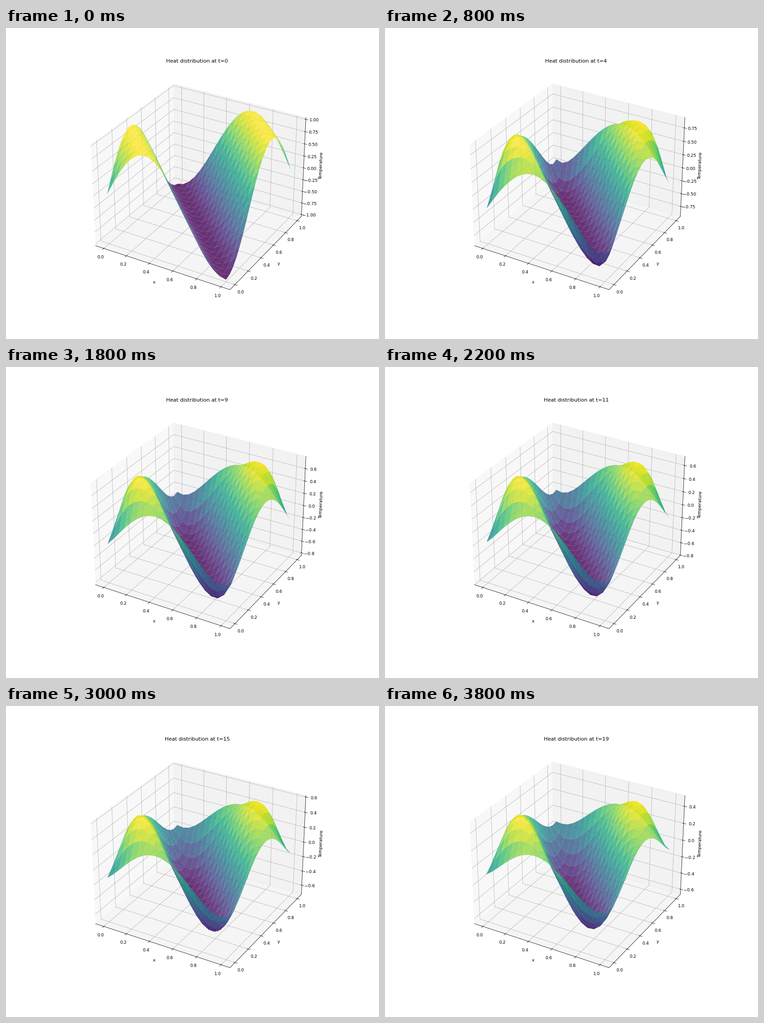
Write a matplotlib script that moves like this. It is 820 px wide and 683 px high and loops after 4 s.

```python
import numpy as np
import matplotlib.pyplot as plt
from matplotlib.animation import FuncAnimation

W, H = 820, 683
DPI = W / 12
N = 20          # grid points per axis
STEPS = 20      # time steps, one per frame
ALPHA = 0.01    # diffusivity

dx = dt = 1 / (N - 1)
r = ALPHA * dt / dx**2
X, Y = np.meshgrid(np.linspace(0, 1, N), np.linspace(0, 1, N))


def step(u):
    """One explicit heat step with wrap-around edges."""
    near = sum(np.roll(u, s, axis) for s in (1, -1) for axis in (0, 1))
    return u + r * (near - 4 * u)


states = [np.sin(1.5 * np.pi * (X + Y))]
for _ in range(STEPS - 1):
    states.append(step(states[-1]))

# The tiny surplus guards against rounding down to one pixel less.
fig = plt.figure(figsize=((W + 1e-4) / DPI, (H + 1e-4) / DPI), dpi=DPI)
ax = fig.add_subplot(111, projection="3d")


def update(i):
    ax.clear()
    ax.plot_surface(X, Y, states[i], cmap="viridis", alpha=0.8)
    ax.set_xlabel("x")
    ax.set_ylabel("y")
    ax.set_zlabel("Temperature")
    ax.set_title(f"Heat distribution at t={i}")
    return []


anim = FuncAnimation(fig, update, frames=STEPS, interval=200,
                     repeat=True, repeat_delay=0, blit=False)
plt.show()
```
